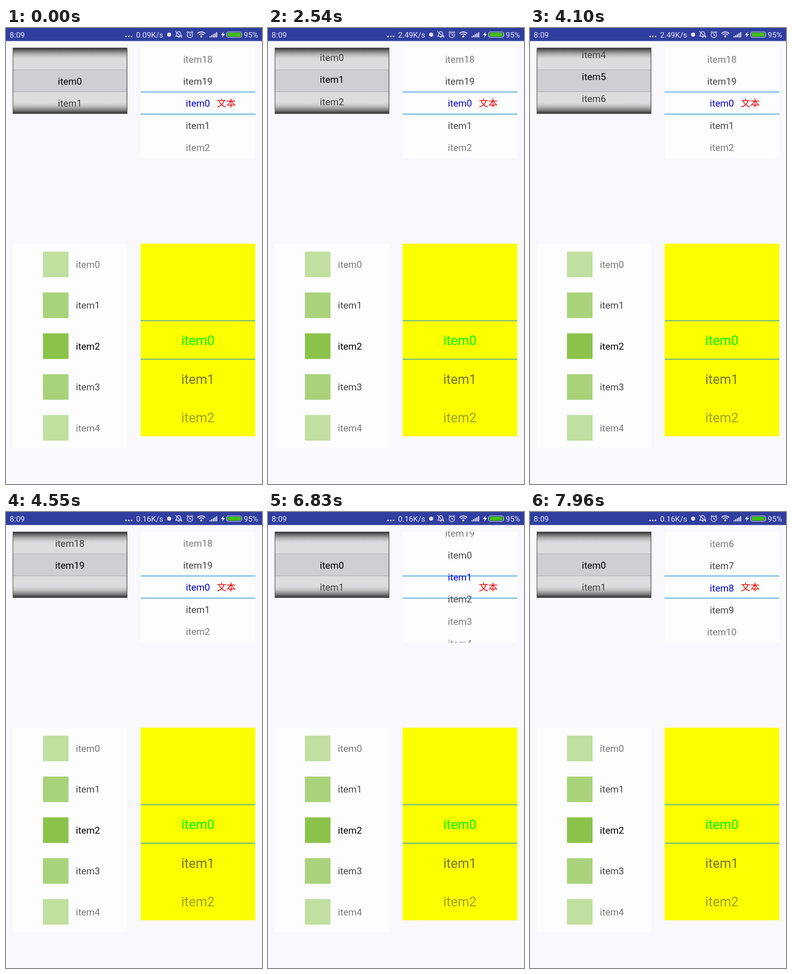
These frames come from a looping animation (561x998 px, 7.99 s). An HTML page with a canvas:

```html
<!DOCTYPE html>
<html lang="en">
<head>
<meta charset="utf-8">
<title>Wheel pickers</title>
<style>
html, body { margin: 0; width: 100%; height: 100%; overflow: hidden; background: #f8f8fd; }
canvas { display: block; width: 561px; height: 998px; }
</style>
</head>
<body>
<canvas width="561" height="998"></canvas>
<script>
const ctx = document.querySelector('canvas').getContext('2d');
const LOOP = 7990;
const ITEMS = 20;
const FONT = 'Roboto, sans-serif';
const LINE_BLUE = '#2492d6';

// Scroll positions in rows: [time in ms, position]
const grayKeys = [
  [2195, 0], [2540, 1.07], [2870, 2], [3085, 2], [3410, 3.6], [3740, 5],
  [4045, 5], [4200, 6.3], [4550, 19], [5275, 19], [5390, 15.5], [5570, 0]
];
const cyclicKeys = [[6505, 0], [6830, 1.455], [7300, 3], [7310, 3], [7960, 7.97]];

// Monotone cubic interpolation: never overshoots a key
function sample(keys, t) {
  if (t <= keys[0][0]) return keys[0][1];
  const i = keys.findIndex(k => k[0] > t);
  if (i < 0) return keys[keys.length - 1][1];
  const slope = k => k < 1 || k >= keys.length ? 0
    : (keys[k][1] - keys[k - 1][1]) / (keys[k][0] - keys[k - 1][0]);
  const tangent = k => {
    const a = slope(k), b = slope(k + 1);
    return a * b > 0 ? 2 * a * b / (a + b) : 0;
  };
  const [t0, p0] = keys[i - 1], [t1, p1] = keys[i];
  const d = t1 - t0, u = (t - t0) / d, v = 1 - u;
  return p0 * (1 + 2 * u) * v * v + p1 * u * u * (3 - 2 * u)
    + d * u * v * (v * tangent(i - 1) - u * tangent(i));
}

function rect(x, y, w, h, color) {
  ctx.fillStyle = color;
  ctx.fillRect(x, y, w, h);
}

function text(str, x, y, size, color, align = 'center', family = FONT) {
  ctx.font = `${size}px ${family}`;
  ctx.textAlign = align;
  ctx.fillStyle = color;
  ctx.fillText(str, x, y);
}

function dot(x, y, r) {
  ctx.beginPath();
  ctx.arc(x, y, r, 0, 7);
  ctx.fill();
}

function stroke(path, width = 1.4) {
  ctx.lineWidth = width;
  ctx.stroke(new Path2D(path));
}

function clipped(x, y, w, h, draw) {
  ctx.save();
  ctx.beginPath();
  ctx.rect(x, y, w, h);
  ctx.clip();
  draw();
  ctx.restore();
}

// Colors run from the selected row outwards
function rows({ x, baseline, pitch, size, pos, colors, cyclic }) {
  const selected = Math.round(pos);
  for (let i = selected - 3; i <= selected + 3; i++) {
    if (!cyclic && (i < 0 || i >= ITEMS)) continue;
    const color = colors[Math.min(Math.abs(i - selected), colors.length - 1)];
    const label = 'item' + (i + ITEMS) % ITEMS;
    text(label, x, baseline + (i - pos) * pitch, size, color);
  }
}

function statusBar(t) {
  const white = '#e4e6f4';
  rect(0, 0, 561, 28.5, '#303f9f');
  const speed = t < 540 ? '0.09' : t < 4400 ? '2.49' : '0.16';
  text('8:09', 8, 20.5, 17.3, white, 'left');
  text(speed + 'K/s', 344.5, 20.5, 17, white, 'right');
  text('95%', 552.5, 20.5, 17, white, 'right');
  for (const x of [263, 269, 275]) dot(x, 18.5, 1.8);
  dot(357.5, 14.5, 4.5);
  ctx.strokeStyle = white;
  stroke('M372 18H385L383 15V12Q382 8 378.500 8Q375 8 374 12V15ZM376.500 20H380.500M371 7L386 21');
  stroke('M409 15A6 6 0 1 1 397 15A6 6 0 1 1 409 15M403 11V15.500H406M396 10L399.500 7M410 10L406.500 7');
  stroke('M419.500 12Q428 5 436.500 12M422.500 15Q428 10.500 433.500 15', 2);
  dot(428, 18.5, 2.2);
  for (let i = 0; i < 5; i++) rect(446 + i * 3.6, 18 - i * 2.2, 2.4, 2.5 + i * 2.2, white);
  ctx.fill(new Path2D('M477 8L471 15.500H475L473.500 21L480 13H476Z'));
  ctx.lineWidth = 1.2;
  ctx.beginPath();
  ctx.roundRect(483.5, 8.5, 33, 12, 4);
  ctx.stroke();
  ctx.fillStyle = '#43c00b';
  ctx.beginPath();
  ctx.roundRect(485.5, 10.3, 29, 8.4, 2.5);
  ctx.fill();
}

function shadow(edge, inner) {
  const g = ctx.createLinearGradient(0, edge, 0, inner);
  g.addColorStop(0, 'rgba(17,17,17,.93)');
  g.addColorStop(1, 'rgba(170,170,170,0)');
  rect(15, Math.min(edge, inner), 251, Math.abs(edge - inner), g);
}

function grayWheel(pos) {
  clipped(14.5, 43, 251.5, 145, () => {
    rect(14, 43, 252, 145, '#dcdcde');
    rect(14, 91.5, 252, 48, '#cfced3');
    rect(14, 91, 252, 1, '#aaaaae');
    rect(14, 139, 252, 1, '#aaaaae');
    rows({ x: 140, baseline: 124, pitch: 48.3, size: 20.8, pos, colors: ['#000', '#373739'] });
    shadow(43, 68);
    shadow(188, 163);
    ctx.strokeStyle = '#555';
    ctx.lineWidth = 1.5;
    ctx.strokeRect(15.2, 43.7, 250, 143.6);
  });
}

function cyclicWheel(pos) {
  clipped(295, 43, 251.5, 242.5, () => {
    rect(295, 43, 252, 243, '#fdfdfe');
    rect(295, 139.3, 252, 1.5, LINE_BLUE);
    rect(295, 187.7, 252, 1.5, LINE_BLUE);
    rows({ x: 420.5, baseline: 172.3, pitch: 48.3, size: 20.8, pos, cyclic: true,
      colors: ['#0000d6', '#444', '#7b7b7b'] });
    text('文本', 462, 172.3, 20.8, '#e60000', 'left', '"Noto Sans CJK SC", "Noto Sans CJK", sans-serif');
  });
}

function iconList() {
  rect(14.5, 472, 251.5, 447, '#fdfdfe');
  for (let i = 0; i < 5; i++) {
    const y = 517.5 + i * 89.4;
    ctx.globalAlpha = [1, 0.73, 0.52][Math.abs(i - 2)];
    rect(81, y - 28, 56, 56, '#8bc34a');
    text('item' + i, 179.5, y + 7.4, 20.8, '#000');
  }
  ctx.globalAlpha = 1;
}

function yellowWheel() {
  rect(295, 472, 251.5, 421.5, '#fcff00');
  rect(295, 639.8, 251.5, 1.5, LINE_BLUE);
  rect(295, 724, 251.5, 1.5, LINE_BLUE);
  rows({ x: 420.5, baseline: 694.2, pitch: 84.3, size: 28.7, pos: 0,
    colors: ['#00f800', '#777722', '#a2a21c', 'transparent'] });
}

function frame(now) {
  const t = now % LOOP;
  rect(0, 0, 561, 998, '#f8f8fd');
  statusBar(t);
  grayWheel(sample(grayKeys, t));
  cyclicWheel(sample(cyclicKeys, t));
  iconList();
  yellowWheel();
  requestAnimationFrame(frame);
}
requestAnimationFrame(frame);
</script>
</body>
</html>
```
